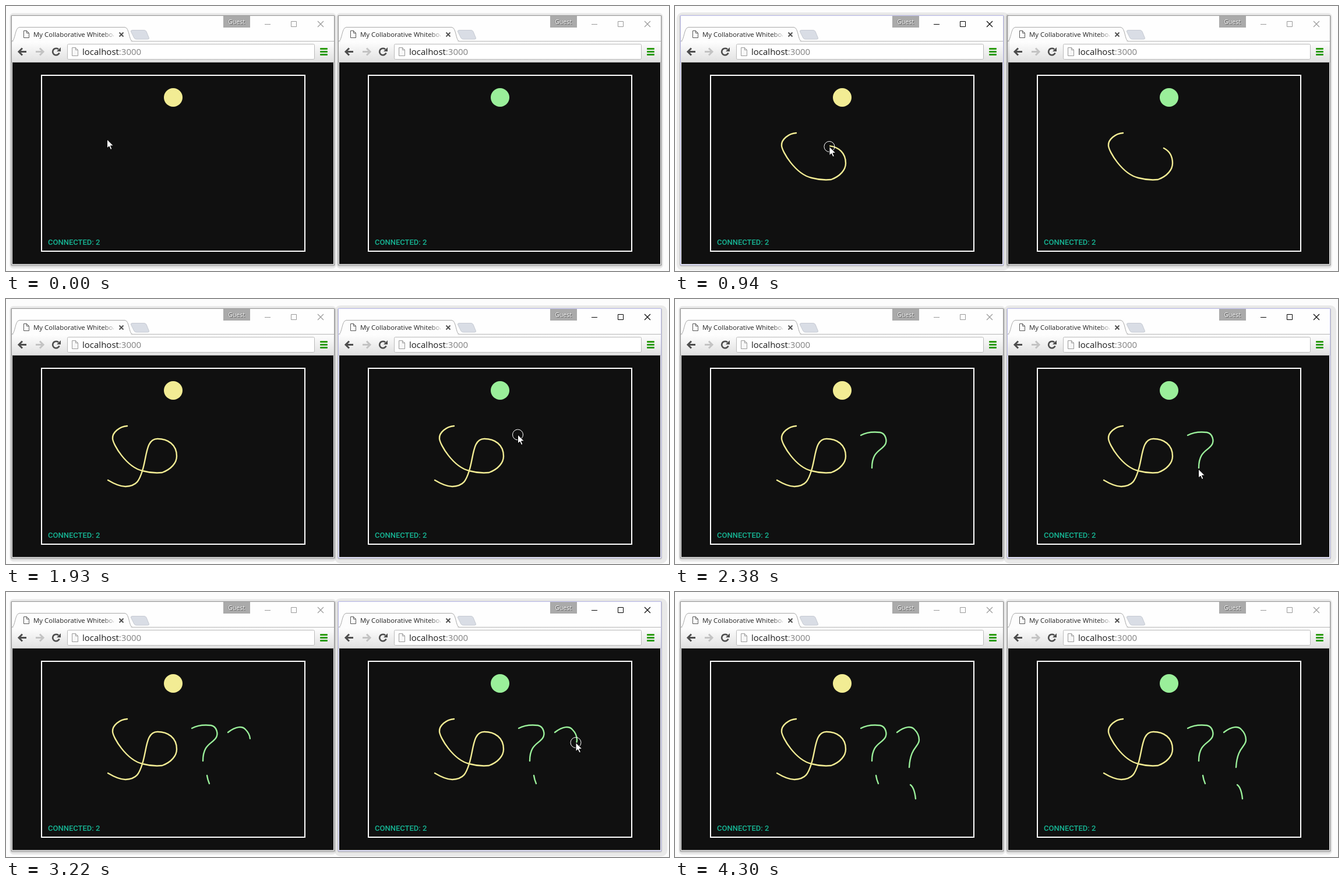
Animation, 1138 px wide and 455 px high, one loop 4330 ms. Source, as an HTML page with a canvas:

```html
<!DOCTYPE html>
<html lang="en">
<head>
<meta charset="utf-8">
<title>Shared whiteboard</title>
<style>
html, body { margin: 0; width: 100%; height: 100%; overflow: hidden; background: #fcfcfc; }
canvas { display: block; }
</style>
</head>
<body>
<canvas id="stage" width="1138" height="455"></canvas>
<script>
const ctx = document.getElementById('stage').getContext('2d');
const LOOP = 4330, OFFSET = 561, LAG = 25, PRESS = 60;
const YELLOW = '#f2ec94', GREEN = '#9aef9a';
const UI_FONT = '"Open Sans", "Noto Sans", sans-serif';

const linear = u => u;
const smooth = u => u * u * (3 - 2 * u);

function leg(start, end, d, ease) {
  const path = document.createElementNS('http://www.w3.org/2000/svg', 'path');
  path.setAttribute('d', d);
  return { start, end, ease, path, shape: new Path2D(d), length: path.getTotalLength(), dx: 0 };
}
// Hovers use stage coordinates, strokes those of a window
const hover = (start, end, d) => leg(start, end, d, smooth);
const stroke = (start, end, d, color, dx) => ({ ...leg(start, end, d, linear), color, dx });

const legs = [
  hover(0, 410, 'M175 228Q190 222 209.5 217'),
  stroke(470, 1240, `M208 218C195 219 182 229 183 240C184 250 206 288 234 295
    C245 298 258 299 268 298C284 292 293 281 293 270C293 250 278 240 260 240
    C240 240 242 270 234 295C229 311 225 321 205 322C195 322 185 317 175 311`, YELLOW, 0),
  hover(1240, 1890, 'M175 311C200 190 600 260 880 232'),
  stroke(1960, 2340, 'M319 234C330 228 343 228 352 229C362 231 365 244 360 251C353 261 338 262 338 290', GREEN, OFFSET),
  hover(2380, 2490, 'M900 291L906 315'),
  stroke(2510, 2610, 'M345 315Q346 322 349 329', GREEN, OFFSET),
  hover(2720, 2940, 'M910 329L942 241'),
  stroke(2980, 3420, 'M381 241C395 230 406 230 411 236C416 241 419 246 419 254C419 266 404 266 402 301', GREEN, OFFSET),
  hover(3440, 3540, 'M963 301L965 331'),
  stroke(3570, 3770, 'M404 331Q411 336 413 355', GREEN, OFFSET),
  hover(3790, 4050, 'M974 355L1092 462')
];
const strokes = legs.filter(l => l.color);

const progress = (l, t) => l.ease(Math.min(1, Math.max(0, (t - l.start) / (l.end - l.start))));

function rect(x, y, w, h, fill) {
  ctx.fillStyle = fill;
  ctx.fillRect(x, y, w, h);
}

function shape(path, fill, line, width = 1) {
  const p = typeof path === 'string' ? new Path2D(path) : path;
  if (fill) { ctx.fillStyle = fill; ctx.fill(p); }
  if (line) { ctx.strokeStyle = line; ctx.lineWidth = width; ctx.stroke(p); }
}

function box(x, y, w, h, r, fill, line) {
  const p = new Path2D();
  p.roundRect(x, y, w, h, r);
  shape(p, fill, line);
}

function disc(x, y, r, fill, line) {
  const p = new Path2D();
  p.arc(x, y, r, 0, Math.PI * 2);
  shape(p, fill, line);
}

function text(s, x, y, font, fill) {
  ctx.font = font;
  ctx.fillStyle = fill;
  ctx.fillText(s, x, y);
}

function blend(x0, y0, x1, y1, from, to) {
  const g = ctx.createLinearGradient(x0, y0, x1, y1);
  g.addColorStop(0, from);
  g.addColorStop(1, to);
  return g;
}

const cross = (x, y, r, color, width) =>
  shape(`M${x - r} ${y - r}l${2 * r} ${2 * r}m0 ${-2 * r}l${-2 * r} ${2 * r}`, null, color, width);

function page(x, y, w, h, color, fill) {
  shape(`M${x} ${y}h${w - 4}l4 4v${h - 4}h${-w}z`, fill, color);
  shape(`M${x + w - 4} ${y}v4h4`, null, color);
}

const arrow = (x, dir, color) =>
  shape(`M${x + 7 * dir} 78.5h${-12 * dir}M${x} 72.5l${-6 * dir} 6l${6 * dir} 6`, null, color, 3);

function shadow(active) {
  if (active) box(3, 11, 571, 443, 10, 'rgba(0,0,0,.075)');
  else box(6, 12, 561, 439, 7, 'rgba(0,0,0,.07)');
  box(8, 15, 557, 433, 4, 'rgba(0,0,0,.09)');
  box(8, 16, 557, 430, 2, 'rgba(0,0,0,.12)');
}

function tabs() {
  rect(373, 17, 46, 20, '#aaa');
  const guest = '10.6px ' + UI_FONT;
  text('Guest', 382, 32, guest, '#555');
  text('Guest', 380, 31, guest, '#888');
  text('Guest', 381, 31, guest, '#fff');

  rect(10, 60, 553, 1, '#b4b4b4');
  shape('M10 60.5C16 60 15 37 23 36.5H204C212 37 211 60 217 60.5', '#fdfdfd', '#a9a9a9');
  rect(13, 60, 201, 1, '#fdfdfd');
  shape('M217 41.5H237Q240 41.5 241 44L245.5 55Q246 57 243 57H224Q221 57 220 55L214.5 44Q214 41.5 217 41.5', '#d9dde5', '#c6cad2');

  page(30.5, 42.5, 9, 12, '#555', '#fff');
  ctx.save();
  ctx.beginPath();
  ctx.rect(44, 38, 141, 20);
  ctx.clip();
  text('My Collaborative Whiteboard', 47, 53, '11.4px ' + UI_FONT, blend(166, 0, 187, 0, '#222', 'rgba(34,34,34,.1)'));
  ctx.restore();
  cross(198, 49, 3.5, '#4c4c4c', 1.8);
}

function toolbar() {
  rect(10, 61, 553, 36, blend(0, 61, 0, 97, '#fefefe', '#e0e0e0'));
  rect(10, 96, 553, 1, '#c4c4c4');
  arrow(28, 1, '#4d4d4d');
  arrow(58, -1, '#c3c3c3');
  const reload = new Path2D();
  reload.arc(86, 78.5, 5.8, 0.35, Math.PI * 1.75);
  shape(reload, null, '#4d4d4d', 2.6);
  shape('M94 71v7h-7z', '#4d4d4d');
  box(105.5, 65.5, 424, 26, 2, '#fff', '#bababa');
  page(113.5, 71.5, 10, 14, '#999', '#f7f7f7');
  const font = '15px ' + UI_FONT;
  text('localhost', 131, 84, font, '#1c1c1c');
  text(':3000', 131 + ctx.measureText('localhost').width, 84, font, '#808080');
  for (let i = 0; i < 3; i++) box(539, 72 + 5 * i, 13, 3, 1, '#2b9b0d');
}

function controls(color) {
  rect(444, 31, 10, 1, color);
  shape('M489.5 26.5h9v9h-9z', null, color);
  cross(540, 31, 5, color, 1.1);
}

function drawing(t, mine) {
  ctx.save();
  ctx.lineCap = ctx.lineJoin = 'round';
  for (const l of strokes) {
    const f = progress(l, l.color === mine ? t : t - LAG);
    if (f <= 0) continue;
    // The first dash is the part drawn so far
    ctx.setLineDash(f < 1 ? [f * l.length, l.length] : []);
    shape(l.shape, null, l.color, 2.4);
  }
  ctx.restore();
}

function browser(dx, color, active, t) {
  ctx.save();
  ctx.translate(dx, 0);
  shadow(active);
  rect(9, 16, 555, 429, active ? '#c0c0f2' : '#9c9c9c');
  rect(10, 17, 553, 427, '#fefefe');
  tabs();
  controls(active ? '#000' : '#999');
  toolbar();
  rect(11, 97, 551, 346, '#101010');
  shape('M61 119h452v302h-452z', null, '#fff', 2);
  disc(287, 157, 16, color);
  text('CONNECTED: 2', 72, 410, '500 13px Roboto, sans-serif', '#16b594');
  drawing(t, color);
  ctx.restore();
}

function cursor(t) {
  const l = legs.filter(g => g.start <= t).pop();
  const p = l.path.getPointAtLength(progress(l, t) * l.length);
  ctx.save();
  ctx.translate(p.x + l.dx - 1.5, p.y + 1);
  if (strokes.some(s => t >= s.start - PRESS && t <= s.end)) disc(0, 0, 9, null, '#fff');
  shape('M0 0V15L3.5 12L6 17.5L8.5 16.5L6 11H11z', '#fff', '#000');
  ctx.restore();
}

// A press brings its window to the front until the loop ends
function focusAt(t) {
  const pressed = strokes.filter(s => t >= s.start - PRESS).pop();
  if (!pressed || t >= 4290) return -1;
  return pressed.dx ? 1 : 0;
}

function draw(t) {
  rect(0, 0, 1138, 455, '#fcfcfc');
  const focus = focusAt(t);
  const views = [[0, YELLOW], [OFFSET, GREEN]];
  for (const i of focus === 0 ? [1, 0] : [0, 1]) browser(...views[i], i === focus, t);
  cursor(t);
}

const began = performance.now();
function tick() {
  draw((performance.now() - began) % LOOP);
  requestAnimationFrame(tick);
}
tick();
</script>
</body>
</html>
```
